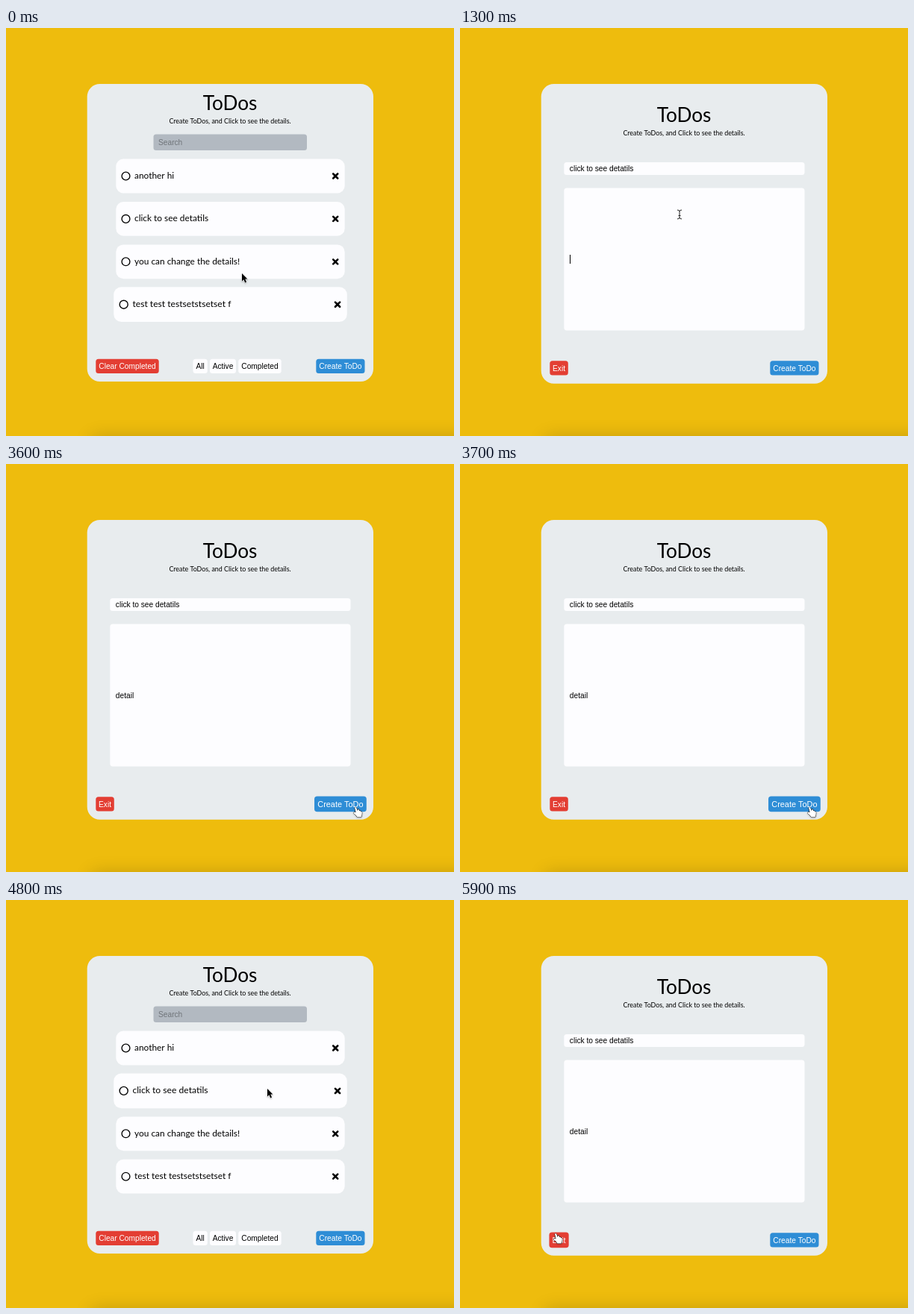
Write an HTML page with a canvas that moves like this. It is 600 px wide and 547 px high and loops after 6000 ms.

```html
<!DOCTYPE html>
<html lang="en">
<head>
<meta charset="utf-8">
<title>ToDos</title>
<style>
  html, body { margin: 0; width: 100%; height: 100%; overflow: hidden; background: #eebc0d; }
  canvas { display: block; }
</style>
</head>
<body>
<canvas width="600" height="547"></canvas>
<script>
const ctx = document.querySelector('canvas').getContext('2d');
const LOOP = 6000, STEP = 100;
const RED = '#e33e33', BLUE = '#2e8dd6', WHITE = '#fdfdff';
const UI = '10.2px "Liberation Sans", Arial, sans-serif';
const lato = size => `${size}px Lato, sans-serif`;
const TODOS = ['another hi', 'click to see detatils', 'you can change the details!', 'test test testsetstsetset f'];

// Pointer path: time, x, y
const PATH = [
  [-100, 322, 352], [0, 316, 329], [100, 311, 308], [300, 300, 270], [500, 294, 252],
  [1200, 294, 250], [2200, 294, 250], [2800, 367, 445], [2900, 367, 445],
  [3200, 484, 452], [3500, 468, 460], [4200, 468, 460], [4300, 464, 452],
  [4500, 415, 345], [4700, 358, 262], [4800, 350, 253], [5000, 350, 254],
  [5200, 280, 330], [5500, 136, 452], [5900, 128, 447]
];
const SHAPES = {
  arrow: new Path2D('M0 0V10.5L2.4 8.3L4.2 12.4L6 11.6L4.3 7.6H7.4Z'),
  hand: new Path2D('M-1 1Q0-1 1.3 1L2.8 5Q4-.1 5 5Q6.6 4 7 6Q9 5 8.8 8Q8.8 11 7.6 13.5H2.4Q1 10.5-2.6 8Q-3 6 .6 7Z'),
  beam: new Path2D('M-3-6Q0-6 0-4Q0-6 3-6M0-4V4M-3 6Q0 6 0 4Q0 6 3 6M-1.5 1.5H1.5')
};

let hover, pointer;

function pointerAt(t) {
  const i = PATH.findIndex(key => key[0] >= t);
  if (i < 1) return PATH[0].slice(1);
  const [t0, x0, y0] = PATH[i - 1], [t1, x1, y1] = PATH[i];
  const k = (t - t0) / (t1 - t0);
  return [x0 + (x1 - x0) * k, y0 + (y1 - y0) * k];
}

const isList = t => t < 600 || (t >= 3800 && t < 4900);

function text(str, x, y, font, color = '#000', align = 'left') {
  ctx.font = font;
  ctx.fillStyle = color;
  ctx.textAlign = align;
  ctx.fillText(str, x, y);
}

// Rounded box that grows around its centre and sets the pointer shape when hovered
function box(x, y, w, h, radius, fill, { grow = 1, shape = 'arrow', content } = {}) {
  const over = hover && hover[0] >= x && hover[0] <= x + w && hover[1] >= y && hover[1] <= y + h;
  ctx.save();
  if (over) {
    pointer = shape;
    ctx.translate(x + w / 2, y + h / 2);
    ctx.scale(grow, grow);
    ctx.translate(-x - w / 2, -y - h / 2);
  }
  ctx.fillStyle = fill;
  ctx.beginPath();
  ctx.roundRect(x, y, w, h, radius);
  ctx.fill();
  if (content) content();
  ctx.restore();
}

function button(label, x, y, w, fill, color) {
  box(x, y, w, 19.3, 3.5, fill, {
    grow: 1.07, shape: 'hand',
    content: () => text(label, x + w / 2, y + 13.4, UI, color, 'center')
  });
}

function header(y) {
  text('ToDos', 300, y, lato(26.2), '#000', 'center');
  text('Create ToDos, and Click to see the details.', 300, y + 18, lato(8.9), '#000', 'center');
}

function row(label, i) {
  const y = 175.6 + i * 57.4, mid = y + 22.9;
  box(147.3, y, 306.4, 45.8, 10, WHITE, { grow: 1.02, content() {
    ctx.strokeStyle = '#000';
    ctx.lineWidth = 1.35;
    ctx.beginPath();
    ctx.arc(160.5, mid, 5.4, 0, 2 * Math.PI);
    ctx.stroke();
    ctx.lineWidth = 2.6;
    ctx.lineCap = 'round';
    ctx.beginPath();
    for (const s of [-1, 1]) {
      ctx.moveTo(438.2, mid - 3 * s);
      ctx.lineTo(444.2, mid + 3 * s);
    }
    ctx.stroke();
    text(label, 172, mid + 3.4, lato(11.9));
  } });
}

function drawList() {
  box(108.7, 75, 383.3, 399, 17, '#e8ecee');
  header(110);
  box(197.5, 142.5, 205.5, 21.5, 3.5, '#b2b9c1', { shape: 'beam' });
  text('Search', 204, 157, UI, '#70757a');
  TODOS.forEach(row);
  button('Clear Completed', 120.3, 443.7, 84.4, RED, '#fff');
  button('All', 250.5, 443.7, 19.3, WHITE, '#000');
  button('Active', 273, 443.7, 35, WHITE, '#000');
  button('Completed', 311.2, 443.7, 57.5, WHITE, '#000');
  button('Create ToDo', 415.3, 443.7, 65.2, BLUE, '#fff');
}

function drawDetail(t) {
  box(108.7, 75, 383.3, 401.7, 17, '#e8ecee');
  header(126);
  box(139.3, 180, 322.2, 17, 3.5, WHITE, { shape: 'beam' });
  text(TODOS[1], 146.8, 192.4, UI);
  box(139.3, 214.5, 322.2, 191, 4, WHITE, { shape: 'beam' });
  const typed = 'detail'.slice(0, Math.max(0, Math.floor((t - 2200) / 100) + 1));
  text(typed, 146.8, 313.5, UI);
  if ((t >= 1200 && t < 1700) || (t >= 2200 && t < 3300)) {
    ctx.fillRect(147 + Math.round(ctx.measureText(typed).width), 304, 1, 12);
  }
  button('Exit', 120.3, 446.3, 24.5, RED, '#fff');
  button('Create ToDo', 415.3, 446.3, 65.2, BLUE, '#fff');
}

function drawPointer([x, y]) {
  const shape = SHAPES[pointer];
  const [fill, edge] = pointer === 'hand' ? ['#fff', '#000'] : ['#000', '#fff'];
  ctx.save();
  ctx.translate(x, y);
  ctx.lineWidth = 1;
  ctx.strokeStyle = pointer === 'beam' ? '#222' : edge;
  if (pointer !== 'beam') {
    ctx.shadowColor = 'rgba(0,0,0,.35)';
    ctx.shadowBlur = 2;
    ctx.shadowOffsetY = 1;
  }
  ctx.stroke(shape);
  ctx.shadowColor = 'transparent';
  ctx.fillStyle = fill;
  if (pointer !== 'beam') ctx.fill(shape);
  ctx.restore();
}

function drawBackdrop() {
  ctx.fillStyle = '#eebc0d';
  ctx.fillRect(0, 0, 600, 547);
  ctx.save();
  ctx.shadowColor = 'rgba(0,0,0,.2)';
  ctx.shadowBlur = 24;
  ctx.fillStyle = '#000';
  ctx.fillRect(115, 549, 600, 40);
  ctx.restore();
}

function draw(t) {
  // Hover reacts one step late and resets when the view changes
  hover = isList(t) === isList(t - STEP) ? pointerAt(t - STEP) : null;
  pointer = 'arrow';
  drawBackdrop();
  if (isList(t)) drawList(); else drawDetail(t);
  const typing = t >= 2200 && t < 2900;
  if (!typing) drawPointer(pointerAt(t));
}

const start = performance.now();
function frame() {
  const t = (performance.now() - start) % LOOP;
  draw(Math.floor(t / STEP) * STEP);
  requestAnimationFrame(frame);
}
frame();
</script>
</body>
</html>
```
